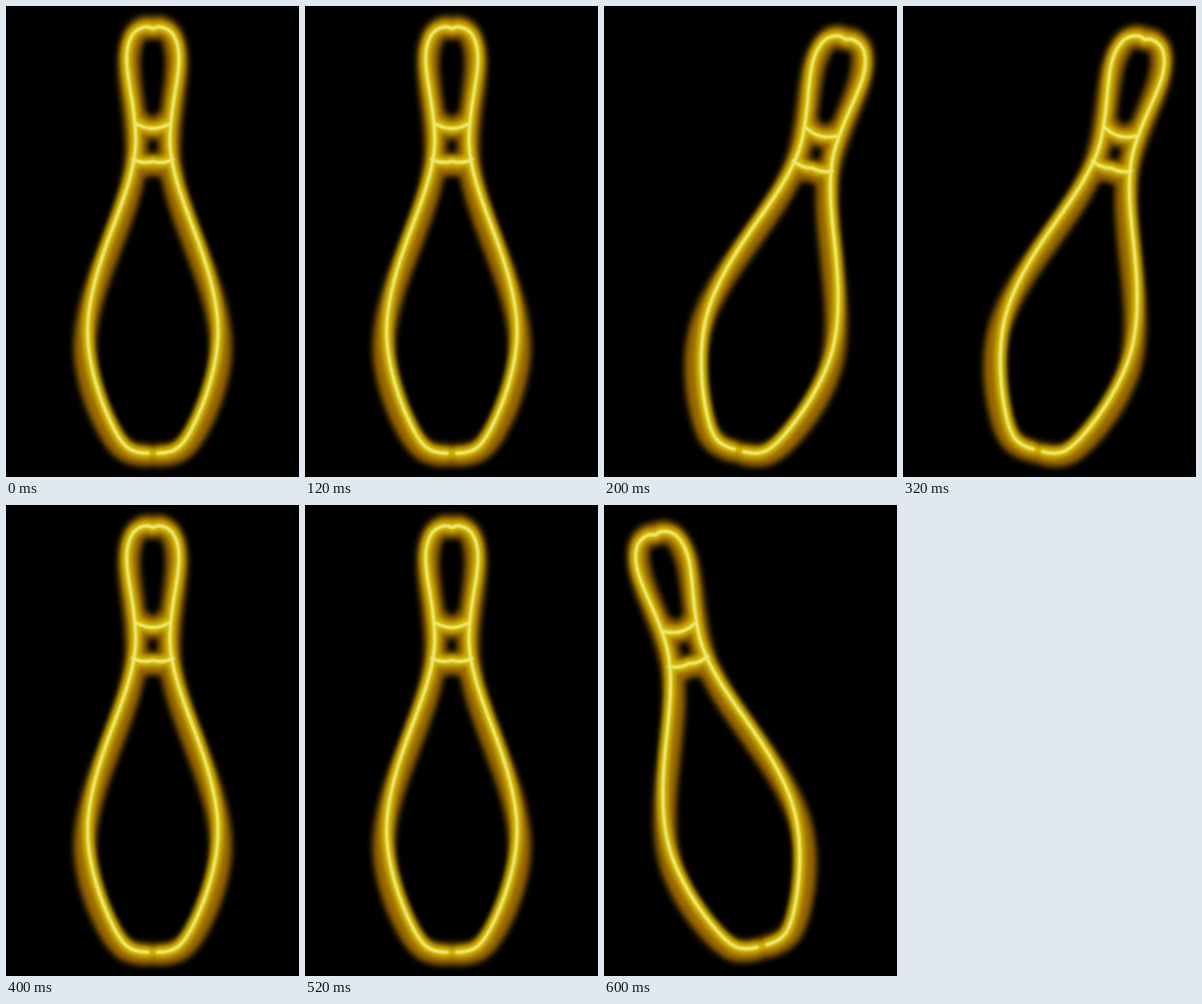
Animation, 420 px wide and 673 px high, one loop 0.8 s. Source, as an HTML page:

```html
<!DOCTYPE html>
<html lang="en">
<head>
<meta charset="utf-8">
<title>Neon bowling pin</title>
<style>
html, body { margin: 0; width: 100%; height: 100%; overflow: hidden; background: #000; }
svg { display: block; width: 100vw; height: 100vh; }
path { fill: none; stroke-linecap: round; stroke-linejoin: round; }
.halo { stroke: #9c6a00; stroke-width: 31; filter: blur(4.8px); }
.glow { stroke: #d2ba00; stroke-width: 15; filter: blur(3.4px); }
.core { stroke: #efe676; stroke-width: 4.8; filter: blur(.8px); }
</style>
</head>
<body>
<svg viewBox="0 0 420 673"><g id="pin"></g></svg>
<script>
const TOP = 30, BASE = 639;
const pin = document.getElementById('pin');

// Half outline as Bezier points: distance from the axis, height
const half = [
  [1, 32], [5, 29], [12, 29], [18, 32],
  [32, 37], [37.5, 57], [37.5, 76],
  [37.5, 108], [24.5, 145], [24.5, 192],
  [24.5, 240], [52, 300], [66, 340],
  [77, 370], [93.5, 420], [93.5, 465],
  [93.5, 515], [74, 570], [55, 606],
  [43, 628], [34, 639], [7, 639]
];

// The halo sags towards the belly: narrower head, wider foot
const sag = ([x, y]) => {
  const t = (y - TOP) / (BASE - TOP);
  return [x * (0.9 + 0.2 * t), y + 18 * Math.sin(Math.PI * t) + 3 * t];
};

const side = (pts, sign) => {
  const [first, ...rest] = pts.map(([x, y]) => [sign * x, y]);
  return `M${first}C${rest.join(' ')}`;
};
const outline = pts => side(pts, -1) + side(pts, 1);

// Two sagging arcs that meet on the axis
const bar = (w, y, dip, mid) =>
  `M${-w},${y}Q${-w / 2},${y + dip} 0,${y + mid}Q${w / 2},${y + dip} ${w},${y}`;
const bars = (k, drop) => bar(26 * k, 167, 8, 8) + bar(29 * k, 219 + drop, 7, 3);

function layer(name, d) {
  const path = document.createElementNS('http://www.w3.org/2000/svg', 'path');
  path.setAttribute('class', name);
  path.setAttribute('d', d);
  pin.append(path);
}

layer('halo', outline(half.map(sag)) + bars(0.6, 4));
layer('glow', outline(half) + bars(0.85, 0));
layer('core', outline(half) + bars(1, 0));

// Foot position and tilt of each pose
const pose = (x, y, deg) =>
  `translate(${x}px, ${y}px) rotate(${deg}deg) translate(0px, ${-BASE}px)`;
const upright = pose(210.5, BASE, 0);
const poses = [upright, pose(193.5, 635, 14.6), upright, pose(226.5, 630, -14.6), upright];
pin.animate(
  poses.map((transform, i) => ({ offset: i / 4, transform, easing: 'step-end' })),
  { duration: 800, iterations: Infinity }
);
</script>
</body>
</html>
```
